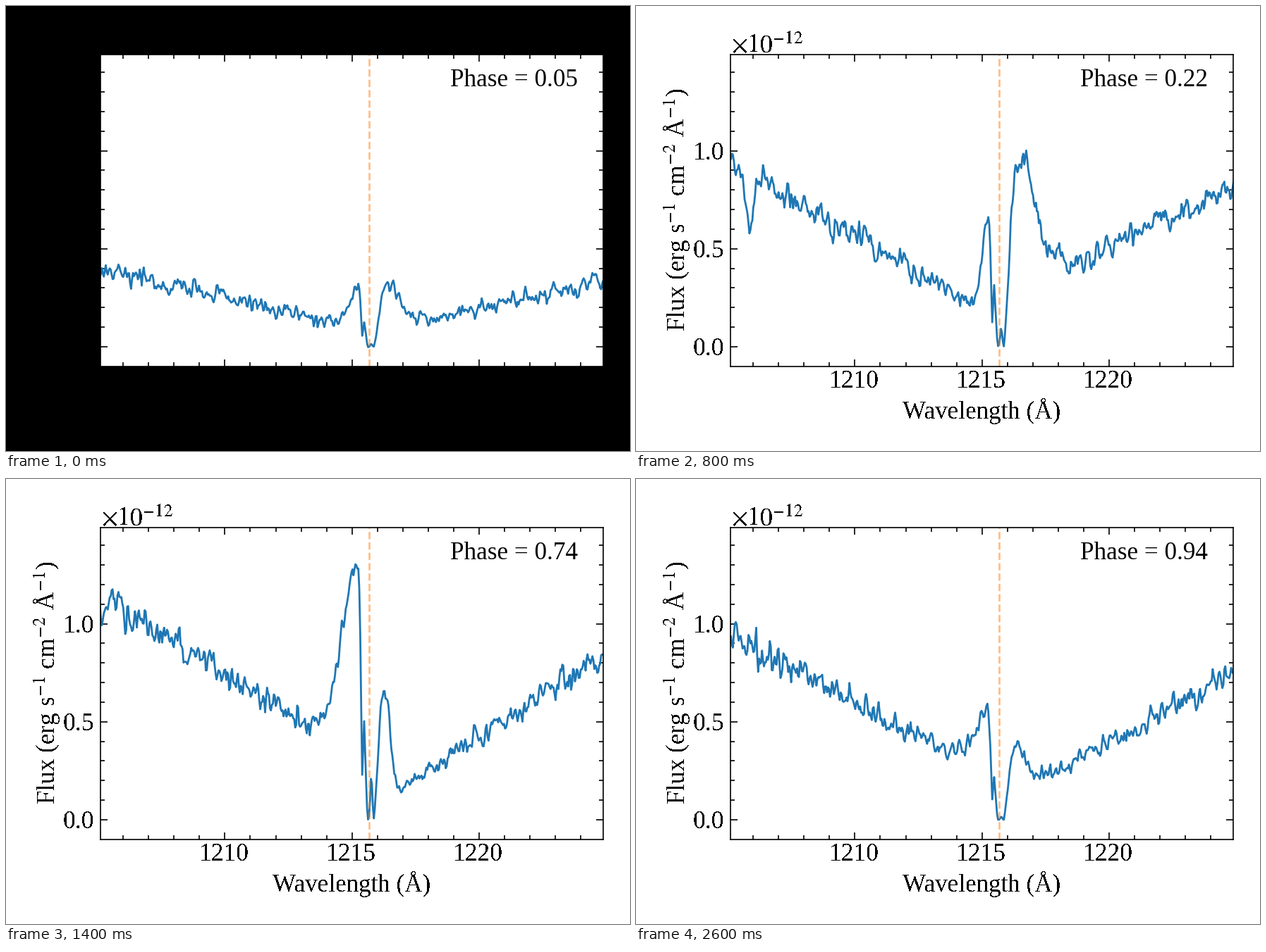
A matplotlib script for the animation above (2.8 s loop, 885 px wide and 632 px high).

```python
import numpy as np
import matplotlib.pyplot as plt
from matplotlib.animation import FuncAnimation
from matplotlib.patches import Rectangle
from matplotlib.ticker import MultipleLocator, NullFormatter

plt.rcParams["font.family"] = "Liberation Serif"
plt.rcParams["mathtext.fontset"] = "stix"

W, H, DPI = 885, 632, 100
STEP_MS = 200
LEFT, RIGHT, TOP, BOTTOM = 134.3, 847.2, 69.3, 511.6
PX_PER_ANGSTROM, PX_PER_FLUX = 36.06, 278.4
X_1210, Y_ZERO = 310.4, 484.0
LYMAN_ALPHA = 1215.67
BLUE_PEAK = -0.45

PHASES = [0.05, 0.06, 0.11, 0.17, 0.22, 0.27, 0.69,
          0.74, 0.77, 0.79, 0.83, 0.87, 0.90, 0.94]


def to_wave(x):
    return 1210 + (x - X_1210) / PX_PER_ANGSTROM


def to_flux(y):
    return (Y_ZERO - y) / PX_PER_FLUX


wave = np.linspace(to_wave(LEFT - 1), to_wave(RIGHT + 1), 520)
offset = wave - LYMAN_ALPHA

# Share of light let through near the line centre.
transmission = np.interp(
    offset,
    [-0.42, -0.36, -0.27, -0.19, -0.06, 0.20, 0.34, 0.48, 0.62],
    [1, 0.85, 0.18, 0.44, 0, 0, 0.35, 0.78, 1])


def bell(x, centre, width):
    return np.exp(-0.5 * ((x - centre) / width) ** 2)


def spectrum(step):
    """Flux of a star whose emission line swings with orbital phase."""
    swing = np.sin(2 * np.pi * PHASES[step])
    level = np.interp(step, [0, 1, 7, 9, 13], [0.40, 0.72, 1.13, 1.00, 0.93])
    line = np.interp(step, [0, 3, 5, 7, 9, 13],
                     [0.18, 0.17, 0.76, 0.68, 0.37, 0.18])
    red_peak = 0.75 + 0.15 * swing

    # Each side: a sloping wing plus emission falling off outwards.
    blue = np.interp(offset, [-10.5, -1.8 + 0.6 * swing],
                     [level, level * (0.335 - 0.09 * swing)])
    blue += line * (1.07 - 0.15 * swing) * bell(
        np.minimum(offset, BLUE_PEAK), BLUE_PEAK, 0.4 - 0.2 * swing)
    red = np.interp(offset, [2.2 + swing, 9.2],
                    [level * (0.30 + 0.17 * swing),
                     level * (0.82 + 0.07 * swing)])
    red += line * (0.95 + 0.17 * swing) * bell(
        np.maximum(offset, red_peak), red_peak, 0.38 + 0.15 * swing)
    blend = np.interp(offset, [BLUE_PEAK, red_peak], [0, 1])
    flux = (blue * (1 - blend) + red * blend) * transmission
    flux += 0.45 * line ** 2 * bell(offset, 0.09, 0.04)

    # Narrow absorption drifting to the blue until it leaves the plot.
    depth = np.interp(step, [0, 1, 3, 5], [0, 0.56, 0.62, 0])
    flux *= 1 - depth * bell(wave, 1206.43 - 0.194 * (step - 1), 0.14)

    rng = np.random.default_rng(40 + step)
    noise = np.convolve(rng.normal(size=wave.size + 2),
                        [0.35, 0.85, 0.35], "valid")
    calm = 1 - 0.7 * bell(offset, 0, 0.6)
    return flux + 0.046 * noise * calm * np.sqrt(np.maximum(flux, 0.01))


fig = plt.figure(figsize=(W / DPI, H / DPI), dpi=DPI)
backdrop = Rectangle((0, 0), 1, 1, transform=fig.transFigure,
                     color="white", lw=0, zorder=-10)
fig.add_artist(backdrop)

ax = fig.add_axes([LEFT / W, 1 - BOTTOM / H,
                   (RIGHT - LEFT) / W, (BOTTOM - TOP) / H])
ax.set_xlim(to_wave(LEFT), to_wave(RIGHT))
ax.set_ylim(to_flux(BOTTOM), to_flux(TOP))
for axis, major, minor in ((ax.xaxis, 5, 1), (ax.yaxis, 0.5, 0.1)):
    axis.set_major_locator(MultipleLocator(major))
    axis.set_minor_locator(MultipleLocator(minor))
    axis.set_major_formatter(NullFormatter())
ax.tick_params(which="both", direction="in", top=True, right=True, width=1.2)
ax.tick_params(which="major", length=7.5)
ax.tick_params(which="minor", length=4)
for spine in ax.spines.values():
    spine.set_linewidth(1.2)

curve, = ax.plot([], [], color="tab:blue", lw=2)
ax.axvline(LYMAN_ALPHA, color="tab:orange", ls="--", lw=2, alpha=0.5)


def label(x, y, text, size=25.6, **kw):
    """Crisp text with its baseline at a pixel position."""
    fig.text(x / W, 1 - y / H, text, fontsize=size, va="baseline",
             antialiased=False, rotation_mode="anchor", **kw)


for tick in (1210, 1215, 1220):
    x = X_1210 + (tick - 1210) * PX_PER_ANGSTROM
    label(x - 1.5, 541.5, str(tick), ha="center")
for tick in (0, 0.5, 1):
    label(125.5, Y_ZERO - tick * PX_PER_FLUX + 12, f"{tick:.1f}", ha="right")
label(490, 586.5, "Wavelength (Å)", 25.2, ha="center")
label(69.5, 289, "Flux (erg s$^{-1}$ cm$^{-2}$ Å$^{-1}$)", 25.4,
      ha="center", rotation=90)
label(135, 66, r"$\times\mathrm{10}^{-12}$", ha="left")

phase_text = fig.text(630.5 / W, 1 - 114.5 / H, "", fontsize=25.3,
                      ha="left", va="baseline")


def draw(step):
    # The surround starts black and turns white at once.
    backdrop.set_color("black" if step == 0 else "white")
    curve.set_data(wave, spectrum(step))
    phase_text.set_text(f"Phase = {PHASES[step]:.2f}")
    return backdrop, curve, phase_text


anim = FuncAnimation(fig, draw, frames=len(PHASES), interval=STEP_MS,
                     init_func=lambda: draw(0), repeat=True, repeat_delay=0)
plt.show()
```
